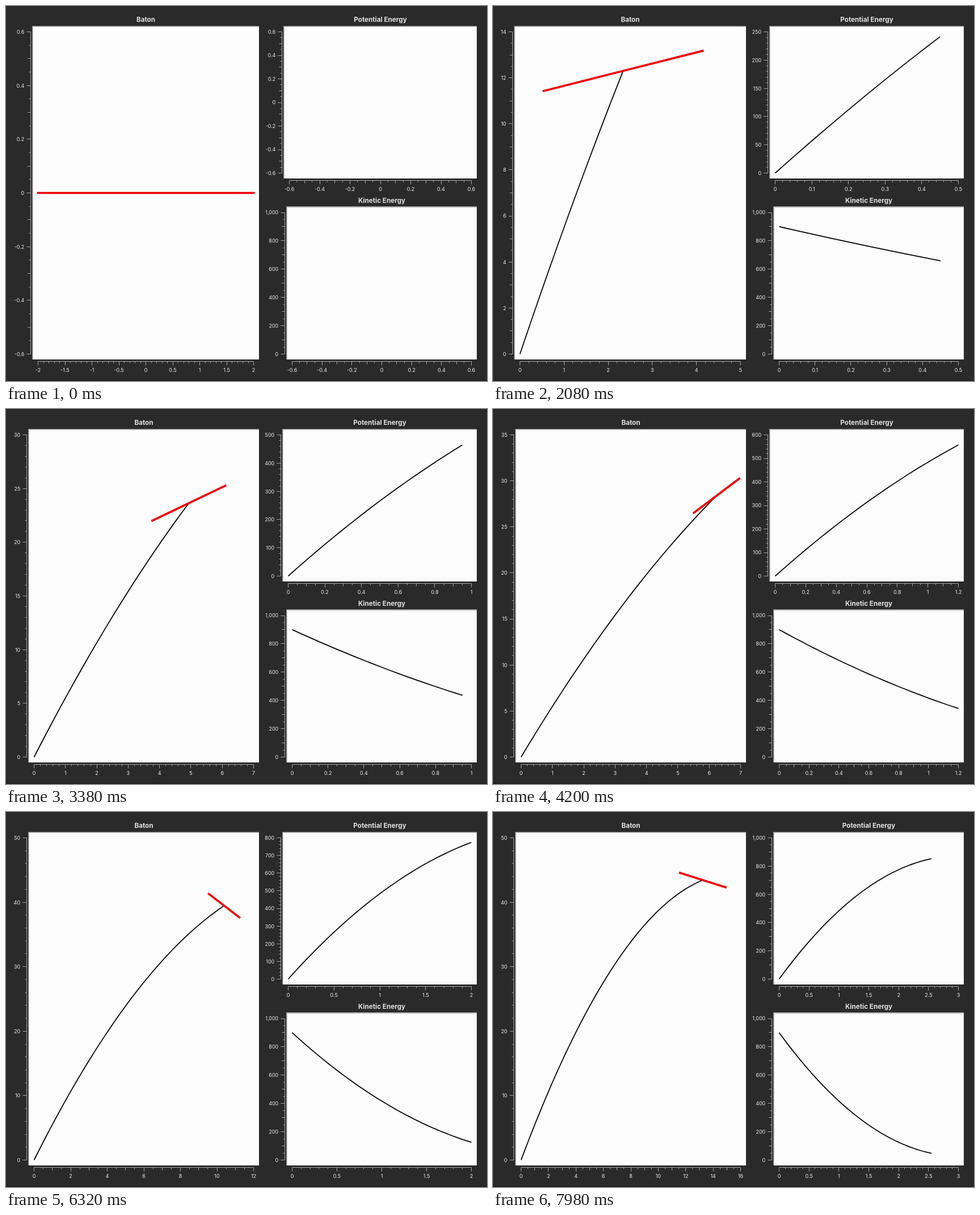
An HTML page that plays this animation: 848 by 661 pixels, repeating every 8 s.

```html
<!DOCTYPE html>
<html lang="en">
<head>
<meta charset="utf-8">
<title>Baton</title>
<style>
  html, body { margin: 0; width: 100%; height: 100%; overflow: hidden; background: #2a2a2a; }
  svg { display: block; width: 100%; height: 100%; }
  text { font-family: Inter, "Open Sans", sans-serif; fill: #ececec; }
  .title { font-size: 11.7px; font-weight: 700; fill: #e0e0e0; text-anchor: middle; }
  .label { font-size: 9px; }
  .axis { stroke: #a6a6a6; stroke-width: 1; fill: none; }
  .curve { stroke: #000; stroke-width: 1.75; fill: none; stroke-linejoin: round; }
  .baton { stroke: #f00000; stroke-width: 3.7; stroke-linecap: square; fill: none; }
</style>
</head>
<body>
<svg id="stage" viewBox="0 0 848 661"></svg>
<script>
const LOOP = 8000, START = 960, CYCLE = 140, DT = 0.05;
const MASS = 2, G = 9.81, SPEED = 30, VX = 5.195;
const VY = SPEED * Math.sin(80 * Math.PI / 180);
const stage = document.getElementById('stage');

const posX = t => VX * t;
const posY = t => VY * t - G * t * t / 2;
const potential = t => MASS * G * posY(t);
const kinetic = t => MASS * SPEED * SPEED / 2 - potential(t);

// Largest "nice" step (1, 2, 5, 10 times a power of ten) for a span
function niceStep(span, parts) {
  const v = span / parts;
  const p = Math.floor(Math.log10(v) + 1e-9);
  const f = v / 10 ** p;
  const m = [1, 2, 5, 10].find(c => f <= c + 1e-6);
  return m * 10 ** p;
}

function autoScale(lo, hi) {
  if (hi - lo < 1e-9) { lo -= 0.5; hi += 0.5; }
  const step = niceStep(hi - lo, 8);
  return {
    lo: Math.floor(lo / step + 1e-6) * step,
    hi: Math.ceil(hi / step - 1e-6) * step,
    step
  };
}

// Calls visit(value, tickLength, isMajor) for every tick
function eachTick(s, visit) {
  const parts = Math.round(s.step / niceStep(s.step, 5));
  const total = Math.round((s.hi - s.lo) / s.step) * parts;
  for (let i = 0; i <= total; i++) {
    const sub = i % parts;
    visit(s.lo + i * s.step / parts, sub === 0 ? 8 : sub * 2 === parts ? 6 : 4, sub === 0);
  }
}

const format = v => (Math.round(v * 1e4) / 1e4 + 0).toLocaleString('en-US');

const GLYPH = { '1': 4, '2': 5.3, '3': 5.5, '.': 2.6, ',': 2.6, '-': 4.4 };
const labelWidth = s => [...s].reduce((w, c) => w + (GLYPH[c] || 5.6), 0);

const crisp = v => Math.floor(v) + 0.5;
const rect = (x, y, w, h, fill) => `<rect x="${x}" y="${y}" width="${w}" height="${h}" fill="${fill}"/>`;
const text = (x, y, str, cls, anchor = 'middle') =>
  `<text x="${x}" y="${y}" class="${cls}" text-anchor="${anchor}">${str}</text>`;

// One plot: frame, axes and the content drawn by draw(px, py)
function plot({ title, left, right, top, bottom, xs, ys, draw }) {
  let widest = 0;
  eachTick(ys, (v, len, major) => {
    if (major) widest = Math.max(widest, labelWidth(format(v)));
  });
  const x0 = Math.floor(left + widest + 14);
  const xa = x0 + 10.5, xb = right - 9.5;
  const ya = bottom - 9.5, yb = top + 10.5;
  const px = v => xa + (v - xs.lo) / (xs.hi - xs.lo) * (xb - xa);
  const py = v => ya - (v - ys.lo) / (ys.hi - ys.lo) * (ya - yb);
  const w = right - x0, h = bottom - top;

  let out = rect(x0, top, w, h, '#fcfcfc')
    + rect(x0, top, w, 1, '#8f8989') + rect(x0, top, 1, h, '#8f8989')
    + rect(x0 + 1, top + 1, w - 1, 1, '#cbc6c6') + rect(x0 + 1, top + 1, 1, h - 1, '#cbc6c6')
    + text((x0 + right) / 2 + 0.5, top - 7, title, 'title');

  const ax = x0 - 2.5, ay = bottom + 3.5;
  let lines = `M${ax} ${crisp(yb)}V${crisp(ya)}M${crisp(xa)} ${ay}H${crisp(xb)}`;
  eachTick(ys, (v, len, major) => {
    const y = py(v);
    lines += `M${ax} ${crisp(y)}h${-len + 1}`;
    if (major) out += text(x0 - 13.7, y + 3.4, format(v), 'label', 'end');
  });
  eachTick(xs, (v, len, major) => {
    const x = px(v);
    lines += `M${crisp(x)} ${ay}v${len - 1}`;
    if (major) out += text(x, bottom + 22.3, format(v), 'label');
  });
  return out + `<path class="axis" d="${lines}"/>` + draw(px, py);
}

function curve(steps, fx, fy) {
  if (!steps) return '';
  let d = '';
  for (let i = 0; i <= steps; i++) {
    d += (i ? 'L' : 'M') + fx(i * DT).toFixed(2) + ' ' + fy(i * DT).toFixed(2);
  }
  return `<path class="curve" d="${d}"/>`;
}

// Simulation step for a time; a growing time axis shows one paint before its data
function stateAt(ms) {
  if (ms < START) return { steps: 0, axisSteps: 0 };
  const u = ms - START;
  const cycle = Math.floor(u / CYCLE);
  const now = cycle + 1;
  if (u % CYCLE < 40) return { steps: now, axisSteps: now };
  const grows = autoScale(0, (now + 1) * DT).hi - autoScale(0, now * DT).hi > 1e-6;
  return { steps: grows ? now : now + 1, axisSteps: now + 1 };
}

function render({ steps, axisSteps }) {
  const t = steps * DT;
  const cx = posX(t), cy = posY(t);
  const dx = 2 * Math.cos(t), dy = 2 * Math.sin(t);
  const halfX = Math.abs(dx), halfY = Math.abs(dy);
  const timeCurve = f => (px, py) => curve(steps, px, s => py(f(s)));

  stage.innerHTML = rect(0, 0, 848, 661, '#2a2a2a') + rect(0, 659, 848, 2, '#231f23')
    + plot({
      title: 'Baton', left: 14, right: 446, top: 35, bottom: 623,
      xs: autoScale(Math.min(0, cx - halfX), cx + halfX),
      ys: autoScale(Math.min(0, cy - halfY), cy + halfY),
      draw: (px, py) => curve(steps, s => px(posX(s)), s => py(posY(s)))
        + `<path class="baton" d="M${px(cx - dx)} ${py(cy - dy)}L${px(cx + dx)} ${py(cy + dy)}"/>`
    })
    + plot({
      title: 'Potential Energy', left: 457, right: 830, top: 35, bottom: 304,
      xs: autoScale(0, t), ys: autoScale(0, potential(t)), draw: timeCurve(potential)
    })
    + plot({
      title: 'Kinetic Energy', left: 457, right: 830, top: 353.5, bottom: 623,
      xs: autoScale(0, axisSteps * DT), ys: autoScale(0, kinetic(0)), draw: timeCurve(kinetic)
    });
}

const begin = performance.now();
let shown = '';
function tick() {
  const state = stateAt((performance.now() - begin) % LOOP);
  const key = state.steps + '/' + state.axisSteps;
  if (key !== shown) {
    shown = key;
    render(state);
  }
  requestAnimationFrame(tick);
}
tick();
</script>
</body>
</html>
```
